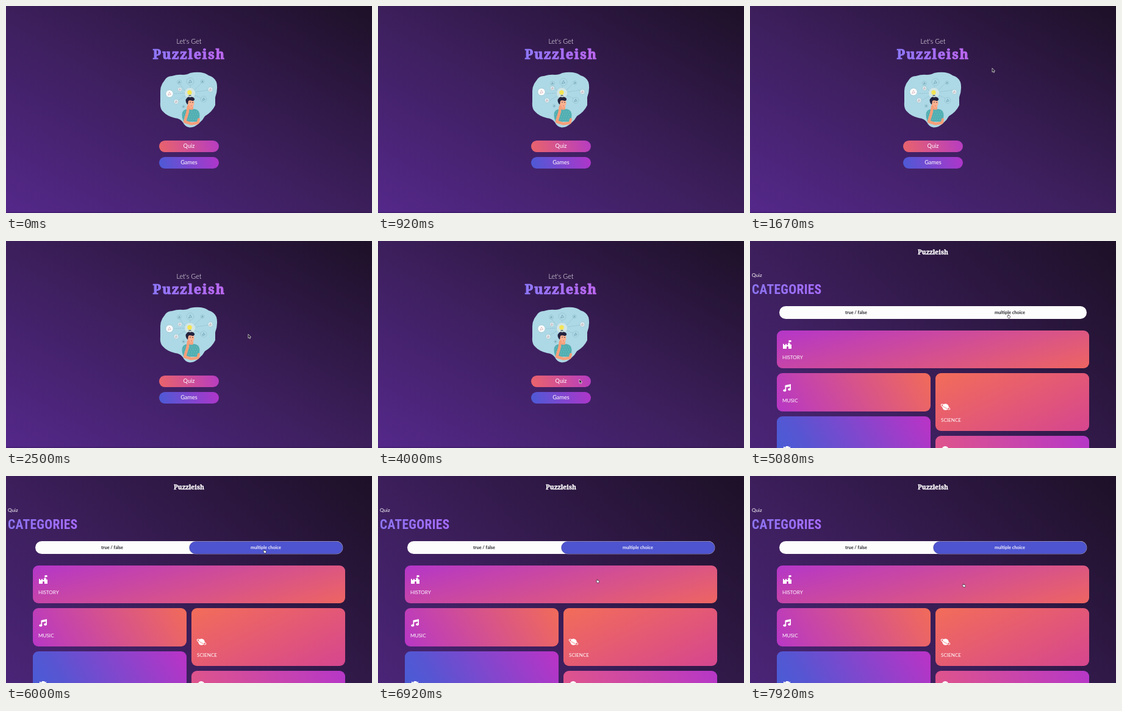
Recreate the animation shown at these times as an HTML page. Size 600 px wide and 340 px high, loop 8000 ms.

```html
<!DOCTYPE html>
<html lang="en">
<head>
<meta charset="utf-8">
<title>Puzzleish</title>
<style>
  html, body { margin: 0; width: 100%; height: 100%; overflow: hidden; background: #3c1e5b; }
  #stage { position: relative; width: 600px; height: 340px; overflow: hidden; }
  .page { position: absolute; inset: 0; overflow: hidden; animation: 8s step-end infinite; }
  .page::before { content: ""; position: absolute; inset: 0;
    background: linear-gradient(to top right, #54288a, #3d1f5d 48%, #1d1027); }
  .home { animation-name: home; }
  .quiz { animation-name: quiz; }
  .quiz::before { height: 560px; }
  .home::after { content: ""; position: absolute; inset: 338px 0 0; background: rgba(25, 8, 50, .2); }
  .box { position: absolute; }
  svg { position: absolute; left: 0; top: 0; overflow: visible; }
  text { font-family: Lato, "Open Sans", sans-serif; fill: #fff; }
  .mid { text-anchor: middle; }
  .logo { font-family: "Noto Serif", serif; font-weight: 900; stroke-linejoin: round; }

  .button { left: 250.7px; width: 98.6px; height: 19px; border-radius: 10px; }
  .card { border-radius: 9px; }
  .wide { left: 44px; width: 512px; }
  .left { left: 44px; width: 252px; }
  .right { left: 304px; width: 252px; }
  .toggle { left: 48px; top: 107px; width: 504px; height: 21px; border-radius: 11px; background: #fdfdfd; }
  .toggle-text text { font-size: 7.4px; font-weight: 700; fill: #26242b; }
  .chosen { opacity: 0; animation: chosen 8s step-end infinite; }
  .toggle-text .chosen text { fill: #f1f0ff; }

  .cursor { left: 0; top: 0; animation: travel 8s ease-in-out infinite; }
  .arrow { animation: home 8s step-end infinite; }
  .hand { animation: quiz 8s step-end infinite; }
  .drift { animation: drift 1333.333ms ease-in-out infinite; }

  @keyframes home { 0% { opacity: 1 } 51% { opacity: 0 } 100% { opacity: 0 } }
  @keyframes quiz { 0% { opacity: 0 } 51% { opacity: 1 } 100% { opacity: 1 } }
  @keyframes chosen { 0% { opacity: 0 } 65.6% { opacity: 1 } 100% { opacity: 1 } }
  @keyframes drift {
    0%, 12.5%, 87.5%, 100% { transform: none }
    25%, 75% { transform: translate(var(--dx), var(--dy)) }
  }
  @keyframes travel {
    0%, 15% { transform: translate(404px, -12px) }
    20.8%, 25% { transform: translate(397px, 102px) }
    30.6%, 34% { transform: translate(397px, 153px) }
    41%, 54% { transform: translate(330px, 227px) }
    62.5%, 79% { transform: translate(421px, 120px) }
    89%, 100% { transform: translate(347.5px, 176px) }
  }
</style>
</head>
<body>
<div id="stage">
  <div class="page home">
    <div class="box button" style="top:221px;background:linear-gradient(75deg,#ea646a,#b63cc2)"></div>
    <div class="box button" style="top:248px;background:linear-gradient(75deg,#4b5ad6,#b035c9)"></div>
    <svg width="600" height="340">
      <defs>
        <linearGradient id="violet">
          <stop stop-color="#8d78fb"/><stop offset="1" stop-color="#bd66f0"/>
        </linearGradient>
        <linearGradient id="lilac">
          <stop stop-color="#8b74f0"/><stop offset="1" stop-color="#a66cff"/>
        </linearGradient>
      </defs>
      <text class="mid" x="300" y="62" font-size="10.8" font-weight="300">Let's Get</text>
      <text class="mid logo" x="300" y="86.5" font-size="21.7" letter-spacing="1.7" stroke="url(#violet)" stroke-width="1" style="fill:url(#violet)">Puzzleish</text>

      <path fill="#add8e5" d="M253 140Q253 130 260 122Q264 115 272 115Q282 112 290 113Q297 113 302 110Q311 108 319 109Q327 110 332 114Q342 117 345 125Q348 136 343 150L343 163Q338 174 326 181Q323 187 317 192Q309 200 301 199.5Q293 198 290 191Q286 185 277 184Q264 181 257 173Q252 168 253 158Z"/>
      <path fill="none" stroke="#7fa9b8" stroke-width=".5" stroke-dasharray="2 1" d="M293 143L275 144M294 140L284 127M302 134V130M309 138L322 125M312 141L332 138M310 147L321 152M293 148L282 155"/>
      <g id="bubbles"></g>
      <circle cx="301.5" cy="143" r="8.5" fill="#d3e6e5"/>
      <circle cx="301" cy="142" r="3.7" fill="#f4e554"/>
      <path stroke="#54626b" stroke-width="1.5" d="M299.5 147H303.5"/>

      <path fill="#f5a27e" d="M300 163H307V172H300Z"/>
      <path fill="#52afb2" d="M289 184Q287 172 294 170L300 169Q304 172 308 169Q317 170 317.5 178L317 185L313 190H291Z"/>
      <path fill="none" stroke="#92d2cf" stroke-width=".8" stroke-dasharray="1 3" d="M292 174H315M290 178H316M292 182H315M291 186H314"/>
      <ellipse cx="303" cy="159.5" rx="5.5" ry="7.6" fill="#fbb18f"/>
      <path fill="#24233f" d="M296 160Q293 154 296 152Q298 148 302 150Q306 148 309 152Q310 155 306 156Q301 154 299 156L298 162Z"/>
      <path stroke="#353044" stroke-width=".8" d="M301 158H303M305 158.5H307"/>
      <path fill="none" stroke="#c85d58" stroke-width=".8" d="M303 164H305"/>
      <path fill="none" stroke="#f69f7a" stroke-width="4.5" stroke-linecap="round" stroke-linejoin="round" d="M299 165L297.5 175L293 190L304 193.5L314 192"/>
      <path fill="none" stroke="#f69f7a" stroke-width="4" stroke-linecap="round" d="M316 186L315 191"/>

      <text class="mid" x="300" y="233.3" font-size="9.2">Quiz</text>
      <text class="mid" x="300" y="260.3" font-size="9.2">Games</text>
    </svg>
  </div>

  <div class="page quiz">
    <div class="box toggle"></div>
    <div class="box card wide" style="top:146.5px;height:62.5px;background:linear-gradient(165deg,#b436c9,#ee6561)"></div>
    <div class="box card left" style="top:217px;height:62.5px;background:linear-gradient(60deg,#b737c6,#f16b59)"></div>
    <div class="box card right" style="top:217px;height:94.5px;background:linear-gradient(155deg,#f36d59,#d5468f)"></div>
    <div class="box card left" style="top:287.5px;height:95px;background:linear-gradient(60deg,#435fd5,#5855d2 25%,#bb33c6)"></div>
    <div class="box card right" style="top:319.5px;height:63px;background:linear-gradient(80deg,#e0558a,#b637c7)"></div>
    <svg width="600" height="340">
      <text class="mid logo" x="300" y="21.5" font-size="10.4" stroke="#fff" stroke-width=".4">Puzzleish</text>
      <text x="3" y="58.5" font-size="8.2">Quiz</text>
      <text x="3" y="87" style="font-family:'Roboto Condensed',Roboto,sans-serif;font-size:21.5px;font-weight:700;font-stretch:75%;letter-spacing:.3px;fill:url(#lilac)">CATEGORIES</text>
      <g class="toggle-text mid">
        <text x="174" y="120">true / false</text>
        <text x="426" y="120">multiple choice</text>
        <g class="chosen">
          <rect x="300.5" y="107.5" width="251.5" height="20.5" rx="10.2" fill="#4e54d0" stroke="#bdb6e6" stroke-width=".7"/>
          <rect x="301" y="108" width="250.5" height="19.5" rx="9.7" fill="none" stroke="#373998" stroke-width=".6"/>
          <text x="426" y="120">multiple choice</text>
        </g>
      </g>
      <g font-size="8.1">
        <text x="53" y="194">HISTORY</text>
        <text x="53" y="265">MUSIC</text>
        <text x="313" y="297">SCIENCE</text>
      </g>
      <g fill="#fff">
        <path d="M54 177V169H56V171H58V169H60V171H62V168H63.5V163H67.5V166H64.5V168H66V170H68V177H63V174Q61.5 171.5 60 174V177Z"/>
        <path d="M57.5 237L67 235V244H65.3V239L59.2 240.3V246H57.5Z"/>
        <ellipse cx="56.8" cy="245.6" rx="2.5" ry="2"/>
        <ellipse cx="64.6" cy="243.7" rx="2.5" ry="2"/>
        <circle cx="320.5" cy="272.5" r="5.2"/>
        <ellipse cx="320.5" cy="272.5" rx="8" ry="2.4" fill="none" stroke="#fff" stroke-width="1.1" transform="rotate(28 320.5 272.5)"/>
        <path d="M314.5 269.5Q319 275 327 276" fill="none" stroke="#ed6668" stroke-width=".8"/>
        <path d="M55 337.5L58 339L59 337H63L64 339L66 337.5V341H55Z"/>
        <circle cx="320" cy="342.5" r="5.5"/>
      </g>
    </svg>
  </div>

  <svg class="cursor" width="10" height="12">
    <path class="arrow" d="M0 0V6.6L1.5 5.3L2.5 7.5L3.6 7L2.7 4.9H4.7Z" fill="#17131c" stroke="#eee" stroke-width=".7"/>
    <path class="hand" d="M.7 3.2L1.4 2.5L2.1 3.2V1.3Q2.5 .7 3 1.3V2.5L5 2.9Q5.8 3.2 5.5 4.3L4.9 6.7H2.4Z" fill="#fff" stroke="#29212e" stroke-width=".7"/>
  </svg>
</div>
<script>
  // x, y, radius, drift x, drift y, filled
  const bubbles = [
    [268, 144, 6, 0, -3, 1], [285, 137, 3.5, 1, -2, 1], [279, 157, 4, -2, -2, 1],
    [291, 165, 2.5, -2, -1, 0], [284, 125, 3.5, 2, 2, 0], [302, 124, 6, 2, 1, 0],
    [322, 124, 3, 1, 2, 0], [335, 137, 4, 0, 4, 1], [324, 153, 5, 0, 2, 0]
  ];
  document.getElementById("bubbles").innerHTML = bubbles.map(([x, y, r, dx, dy, filled]) => {
    const fill = filled ? (r > 5 ? "#fff" : "#deeff2") : "#add8e5";
    const ink = filled ? "#c08b98" : "#568c9d";
    const h = r * .42;
    return `<g class="drift" style="--dx:${dx}px;--dy:${dy}px">
      <circle cx="${x}" cy="${y}" r="${r}" fill="${fill}" stroke="#8ab8c5" stroke-width=".5"/>
      <path d="M${x - h} ${y + h}L${x} ${y - h}L${x + h} ${y + h * .5}Z" fill="none" stroke="${ink}" stroke-width=".6"/>
    </g>`;
  }).join("");
</script>
</body>
</html>
```
